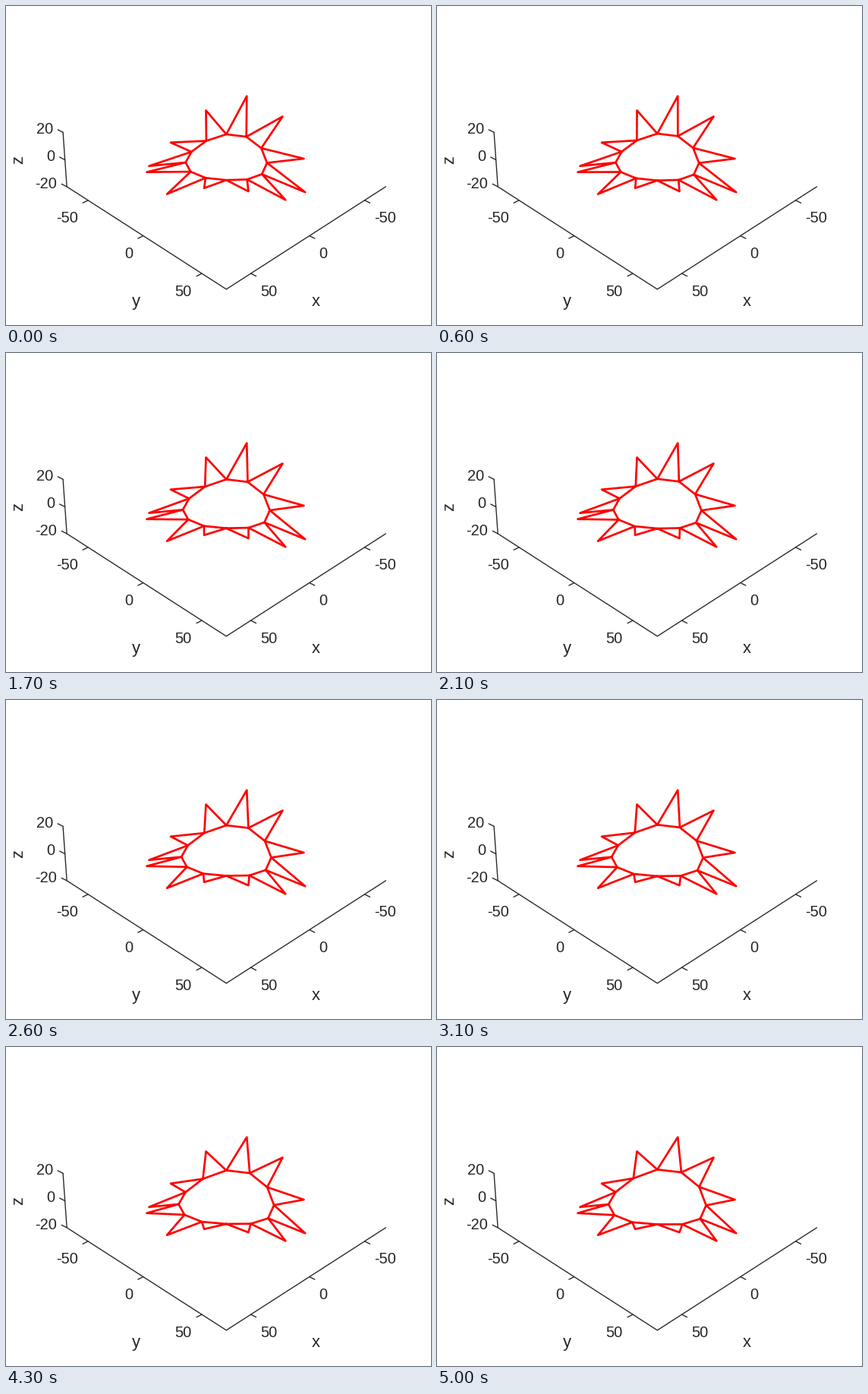
These frames come from a looping animation (560x420 px, 5100 ms). A matplotlib script:

```python
import numpy as np
import matplotlib.pyplot as plt
from matplotlib.animation import FuncAnimation

W, H, DPI = 560, 420, 100
PX = 72 / DPI  # points per pixel
FRAMES, STEP_MS = 51, 100
INK = "#262626"

# Perspective camera looking along (-1, -1, -1)
CENTER_X, CENTER_Y = 290.3, 202.5
ZOOM, DEPTH, Z_SCALE = 2.148, 0.000583, 1.02
XY_LIM, Z_LIM = 70, 20

SPIKES = 12
TIP_RADIUS, TIP_HEIGHT = 50, 15
RING_RADIUS, RING_GROWTH = 25, 0.1
SAG = 0.75  # how much of the tips' height the ring follows

plt.rcParams["font.family"] = "Liberation Sans"

fig = plt.figure(figsize=(W / DPI, H / DPI), dpi=DPI, facecolor="white")
ax = fig.add_axes([0, 0, 1, 1])
ax.set_xlim(0, W)
ax.set_ylim(H, 0)
ax.axis("off")


def project(x, y, z):
    z = z * Z_SCALE
    scale = ZOOM / (1 - DEPTH * (x + y + z))
    return (CENTER_X + scale * (y - x) / np.sqrt(2),
            CENTER_Y + scale * (x + y - 2 * z) / np.sqrt(6))


def stroke(x, y, color=INK, width=1.35):
    return ax.plot(x, y, color=color, lw=width * PX, snap=False,
                   solid_joinstyle="round", solid_capstyle="round")[0]


def label(x, y, text, size=20, ha="center", **kw):
    ax.text(x, y, text, fontsize=size * PX, color=INK, ha=ha, va="baseline", **kw)


def tick(point, value, dx, dy, text_dx, text_dy):
    x, y = project(*point)
    stroke([x, x + dx], [y, y + dy])
    label(x + text_dx, y + text_dy, str(value), ha="right" if dx < 0 else "left")


def draw_axes():
    m, b = XY_LIM, -Z_LIM
    corners = [(m, -m, Z_LIM), (m, -m, b), (m, m, b), (-m, m, b)]
    stroke(*zip(*(project(*c) for c in corners)))
    for v in (-50, 0, 50):
        tick((v, m, b), v, 7, 3.5, 12.3, 29.5)
        tick((m, v, b), v, -7, 3.5, -13.4, 29.5)
    for v in (-20, 0, 20):
        tick((m, -m, v), v, -7, -3.5, -13, 2)
    label(171, 395, "y", 22)
    label(408, 395, "x", 22)
    label(22.5, 202, "z", 22, rotation=90, rotation_mode="anchor")


tip_angle = np.arange(SPIKES) * 2 * np.pi / SPIKES
ring_angle = tip_angle + np.pi / SPIKES
tip_z = TIP_HEIGHT * np.sin(np.linspace(0, 4 * np.pi, SPIKES))
waves = np.fft.rfft(tip_z) / SPIKES


def ring_height(r):
    """Smooth film spanned by the tips: wave k fades as radius to the power k."""
    k = np.arange(1, len(waves) - 1)
    film = waves[k] * (r / TIP_RADIUS) ** k * np.exp(1j * np.outer(ring_angle, k))
    return SAG * 2 * film.real.sum(axis=1)


def circle(r, angle, z):
    return np.column_stack(project(r * np.cos(angle), r * np.sin(angle), z))


draw_axes()
tips = circle(TIP_RADIUS, tip_angle, tip_z)
star = stroke([], [], "red", 2.7)


def draw(i):
    r = RING_RADIUS + RING_GROWTH * i
    ring = circle(r, ring_angle, ring_height(r))
    zigzag = np.stack([tips, ring], axis=1).reshape(-1, 2)
    path = np.vstack([ring[-1:], zigzag, ring])
    star.set_data(path[:, 0], path[:, 1])
    return [star]


anim = FuncAnimation(fig, draw, frames=FRAMES, init_func=lambda: draw(0),
                     interval=STEP_MS, repeat=True, repeat_delay=0)
plt.show()
```
